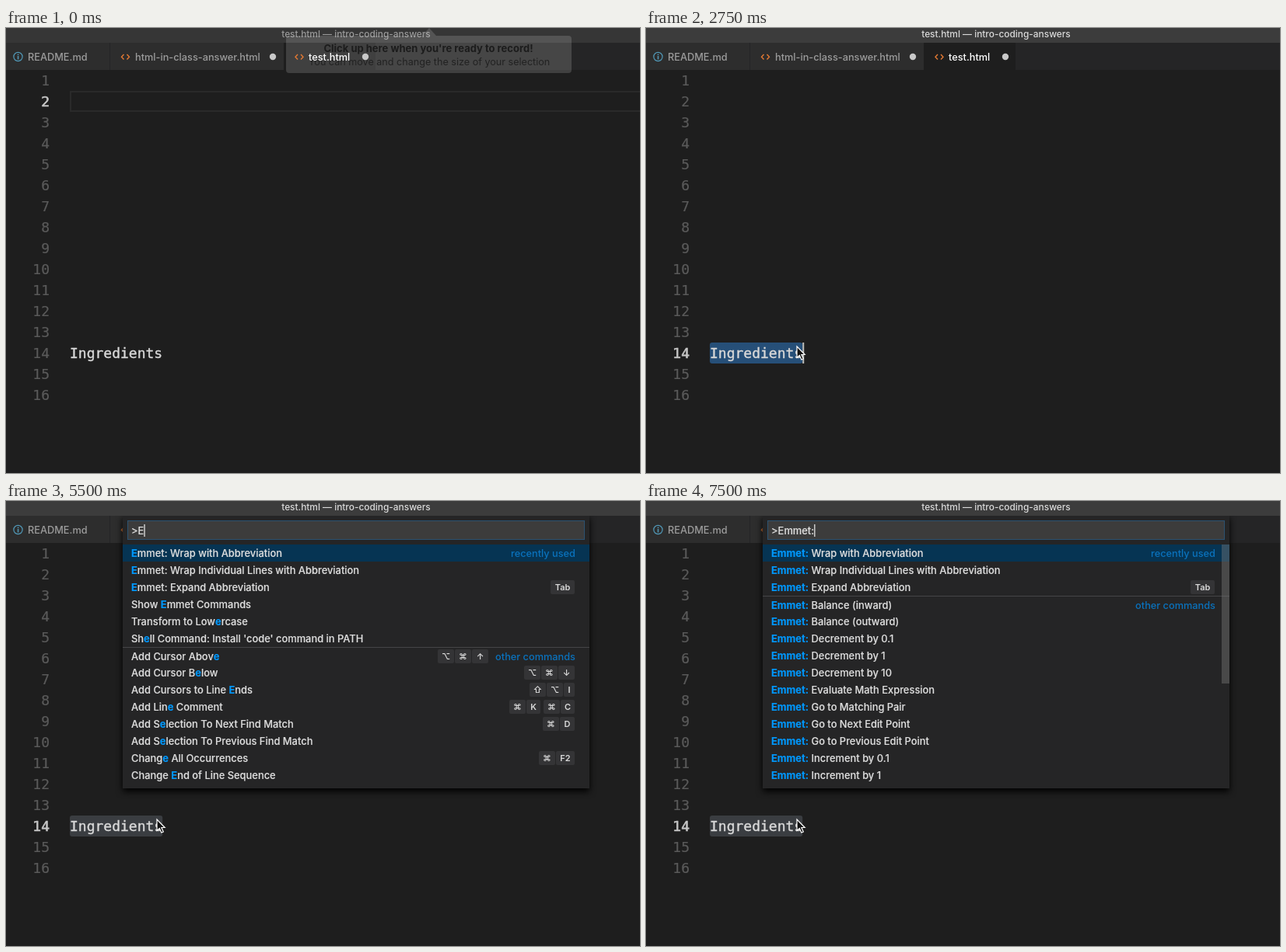
Animation of 815 by 573 pixels, one loop 8 s. Source, as an HTML page:

```html
<!DOCTYPE html>
<html lang="en">
<head>
<meta charset="utf-8">
<title>Editor command palette</title>
<style>
  html, body { margin: 0; width: 100%; height: 100%; overflow: hidden; background: #1e1e1e; }
  svg { display: block; width: 815px; height: 573px; }
  text { font: 500 12.75px Inter, "DejaVu Sans", sans-serif; fill: #d0d0d0; }
  .code { font: 18px "DejaVu Sans Mono", monospace; fill: #d8d8d8; stroke: #d8d8d8; stroke-width: .4px; }
  .number { fill: #5a5a5a; stroke: #5a5a5a; stroke-width: .2px; }
  .active { fill: #c6c6c6; stroke: #c6c6c6; stroke-width: .6px; }
  .title { font-size: 11.9px; fill: #dadada; }
  .row { font-size: 12.9px; fill: #dedede; stroke: #dedede; stroke-width: .15px; }
  .group { fill: #0a72bd; }
  .key { font-size: 11px; font-weight: 600; fill: #dadada; }
  .match { font-weight: 700; fill: #0097fb; stroke: #0097fb; }
  .end { text-anchor: end; }
  .middle { text-anchor: middle; }
  .palette { filter: drop-shadow(0 4px 4px #000); }
</style>
</head>
<body>
<svg id="stage" viewBox="0 0 815 573"></svg>
<script>
const stage = document.getElementById('stage');
const LOOP = 8000, STEP = 250;
const ROW = 27, CHAR = 10.84, CODE_X = 82;

const recent = [
  ['Emmet: Wrap with Abbreviation'],
  ['Emmet: Wrap Individual Lines with Abbreviation'],
  ['Emmet: Expand Abbreviation', 'Tab'],
  ['Show Emmet Commands'],
  ['Transform to Lowercase'],
  ["Shell Command: Install 'code' command in PATH"]
];
const others = [
  ['Add Cursor Above', '⌥ ⌘ ↑'],
  ['Add Cursor Below', '⌥ ⌘ ↓'],
  ['Add Cursors to Line Ends', '⇧ ⌥ I'],
  ['Add Line Comment', '⌘ K , ⌘ C'],
  ['Add Selection To Next Find Match', '⌘ D'],
  ['Add Selection To Previous Find Match'],
  ['Back', '^ -'],
  ['Change All Occurrences', '⌘ F2'],
  ['Change End of Line Sequence'],
  ...['Balance (inward)', 'Balance (outward)', 'Decrement by 0.1', 'Decrement by 1',
    'Decrement by 10', 'Evaluate Math Expression', 'Go to Matching Pair',
    'Go to Next Edit Point', 'Go to Previous Edit Point', 'Increment by 0.1',
    'Increment by 1'].map(name => ['Emmet: ' + name])
];
const keyWidths = { I: 15, K: 19, C: 19, D: 20, '-': 17, F2: 25, Tab: 32, ',': 3 };

// Timelines: [start, value]
const pointer = [
  [0, null], [250, [106, 266]], [500, [46, 325]], [750, [75, 413]],
  [1500, [78.5, 429]], [1750, [77.5, 428]], [2250, [143.5, 415]],
  [2500, [185.5, 413.5]], [2750, [194, 410]]
];
const selected = [[0, 0], [2250, 6], [2500, 10], [2750, 11]];
const queries = [[0, ''], [5500, 'E'], [5750, 'Emm'], [6000, 'Emme'], [6250, 'Emmet'], [6500, 'Emmet:']];
const editorCaret = [[0, 0], [1500, 1], [1750, 0], [2250, 1], [3250, 0], [3750, 1], [4000, 0]];
const inputCaret = [[0, 1], [4500, 0], [5000, 1], [7000, 0], [7500, 1]];
const thumbHeight = [[0, 0], [4500, 20], [5500, 0], [7000, 179]];

const at = (timeline, t) => timeline.findLast(([start]) => start <= t)[1];
const rect = (x, y, w, h, fill, extra = '') =>
  `<rect x="${x}" y="${y}" width="${w}" height="${h}" fill="${fill}" ${extra}/>`;
const text = (x, y, content, cls = '', extra = '') =>
  `<text x="${x}" y="${y}" class="${cls}" ${extra}>${content}</text>`;
const rowTop = line => 54 + ROW * (line - 1);

function editor(t) {
  const line = t < 1500 ? 2 : 14, top = rowTop(line), count = at(selected, t);
  let out = rect(0, 0, 815, 573, '#1e1e1e');
  if (!count) out += rect(83, top + 1, 740, ROW - 2, 'none', 'stroke="#2a2a2a" stroke-width="2"');
  else out += rect(CODE_X, top, count * CHAR, ROW, t < 4000 ? '#264f78' : '#3a3d41', 'rx="3"');
  for (let n = 1; n <= 16; n++)
    out += text(56, rowTop(n) + 20, n, `code end ${n === line ? 'active' : 'number'}`);
  out += text(CODE_X, rowTop(14) + 20, 'Ingredients', 'code');
  if (at(editorCaret, t)) out += rect(CODE_X + count * CHAR, top, 2, ROW, '#bfbfbd');
  return out;
}

const titleBar = t => rect(0, 0, 815, 19, t < 1500 ? '#363636' : '#3c3c3c') +
  text(450, 12, 'test.html — intro-coding-answers', 'title middle', t < 1500 ? 'style="fill:#999"' : '');

const tabBar = () => rect(0, 19, 815, 35, '#252526') + rect(0, 19, 133, 35, '#2d2d2d') +
  rect(134, 19, 223, 35, '#2d2d2d') + rect(357, 19, 118, 35, '#1e1e1e');

const angles = x => `<path d="M${x + 3.5} 34l-3 3.2 3 3.2m4-6.4l3 3.2-3 3.2" fill="none" stroke="#e37933" stroke-width="1.4"/>`;
const dot = x => `<circle cx="${x}" cy="37" r="4.2" fill="#c8c8c8"/>`;

const tabLabels = () =>
  '<circle cx="15.5" cy="37" r="5.6" fill="none" stroke="#519aba" stroke-width="1.2"/>' +
  rect(14.8, 33.6, 1.5, 1.5, '#519aba') + rect(14.8, 36, 1.5, 4.5, '#519aba') +
  text(28, 42, 'README.md', '', 'style="fill:#9c9c9c"') +
  angles(148) + text(166, 42, 'html-in-class-answer.html', '', 'style="fill:#9c9c9c"') + dot(343) +
  angles(371.5) + text(389, 42, 'test.html', '', 'style="fill:#fff"') + dot(462);

const recorderHint = () =>
  '<path d="M364 10H535L544 0L553 10H723a4 4 0 0 1 4 4V54a4 4 0 0 1-4 4H364a4 4 0 0 1-4-4V14a4 4 0 0 1 4-4z" fill="#fff" fill-opacity=".15"/>' +
  text(543, 31, "Click up here when you're ready to record!", 'middle', 'style="font-size:13px;font-weight:700;fill:#1c1c1c"') +
  text(544, 48, 'You can move and change the size of your selection', 'middle', 'style="font-size:12.6px;font-weight:400;fill:#222"');

function keys(combo, right, y) {
  let out = '';
  for (const key of combo.split(' ').reverse()) {
    const width = keyWidths[key] || 22;
    right -= width;
    if (key !== ',')
      out += rect(right, y - 9, width - 1, 18, '#343436', 'rx="2"') +
        text(right + (width - 1) / 2, y + 4, key, 'key middle');
  }
  return out;
}

// Prefer a match at the start of a word, as the palette's filter does.
function highlight(name, query) {
  if (!query) return name;
  let i = name.search(new RegExp('\\b' + query, 'i'));
  if (i < 0) i = name.toLowerCase().indexOf(query.toLowerCase());
  const end = i + query.length;
  return `${name.slice(0, i)}<tspan class="match">${name.slice(i, end)}</tspan>${name.slice(end)}`;
}

function palette(t) {
  const query = at(queries, t);
  const matches = list => list.filter(([name]) => name.toLowerCase().includes(query.toLowerCase()));
  const top = matches(recent), rows = [...top, ...matches(others)].slice(0, 14);
  let out = `<g class="palette">${rect(150, 18, 600, 352, '#252526')}</g>` +
    rect(156.5, 25.5, 587, 24, '#3c3c3c', 'stroke="#2c5270"') +
    text(161, 43, '&gt;' + query, 'row', 'id="query"') + rect(150, 56, 600, 22, '#063453');
  rows.forEach(([name, combo], i) => {
    const first = i === top.length, y = 67 + 22 * i + (first ? 1 : 0);
    if (first) out += rect(150, y - 12, 600, 1, '#454547');
    out += text(161, y + 5, highlight(name, query), 'row');
    if (i === 0 || first) out += text(732, y + 5, first ? 'other commands' : 'recently used', 'group end');
    if (combo) out += keys(combo, first ? 621 : 732, y);
  });
  out += rect(740, 56, 10, at(thumbHeight, t), '#797979', 'fill-opacity=".42"');
  if (at(inputCaret, t)) out += rect(0, 30, 1.3, 16, '#e0e0e0', 'id="caret"');
  return out;
}

function mouse(t) {
  const spot = at(pointer, t);
  return spot ? `<path transform="translate(${spot})" d="M0 0V14.5L3.4 11.5L5.8 17L8.3 16L5.9 10.5H10.2Z" fill="#111" stroke="#fff" stroke-width="1.2"/>` : '';
}

function draw(t) {
  stage.innerHTML = editor(t) + tabBar() + titleBar(t) + (t < 250 ? recorderHint() : '') +
    tabLabels() + (t >= 4000 ? palette(t) + titleBar(t) : '') + mouse(t);
  const caret = document.getElementById('caret');
  if (caret) caret.setAttribute('x', 161 + document.getElementById('query').getComputedTextLength());
}

let shown = -1;
function tick() {
  const t = Math.floor(performance.now() % LOOP / STEP) * STEP;
  if (t !== shown) draw(shown = t);
  requestAnimationFrame(tick);
}
tick();
</script>
</body>
</html>
```
